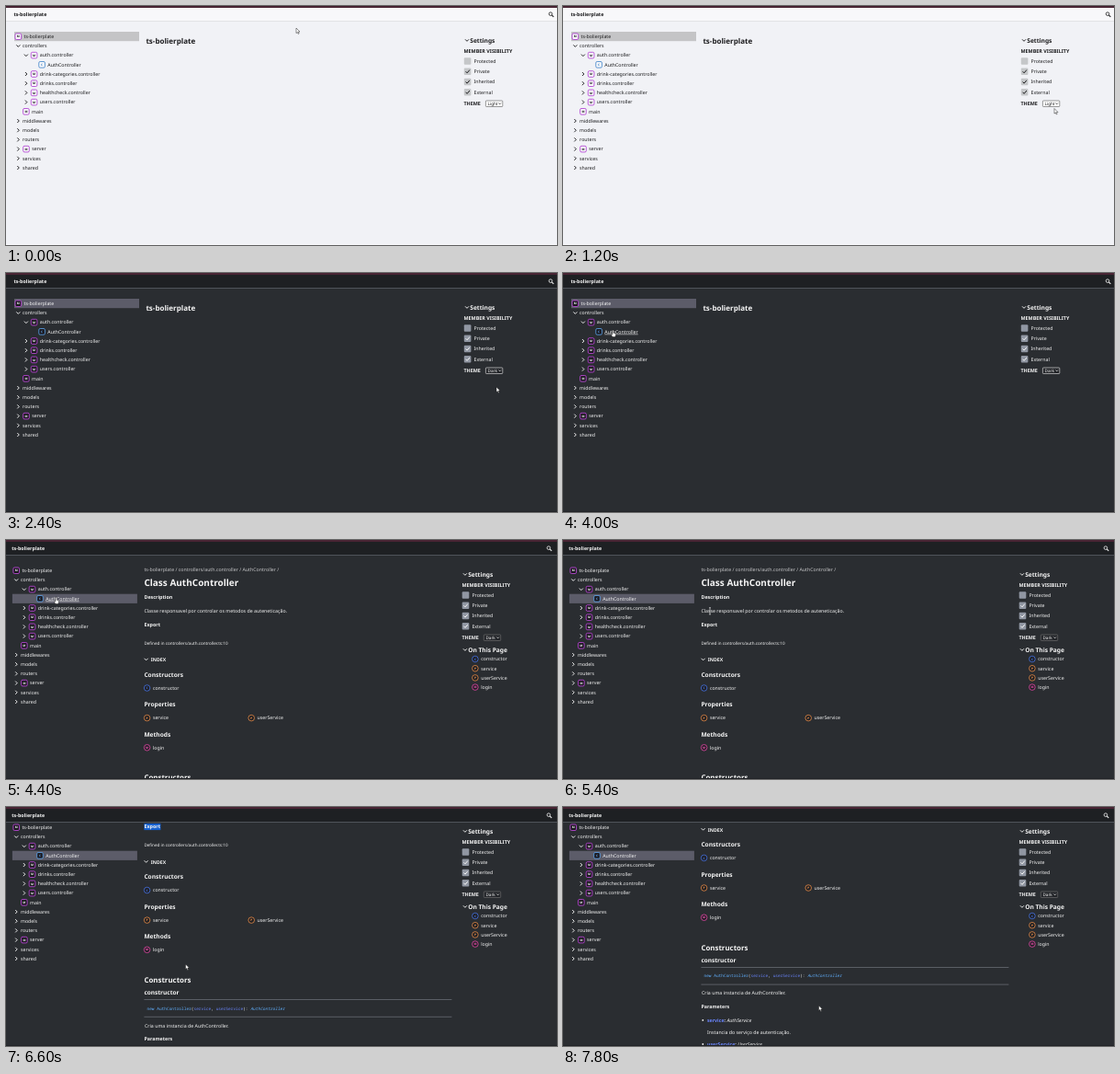
An HTML page that plays this animation: 600 px wide and 260 px high, repeating every 8000 ms.

```html
<!DOCTYPE html>
<html lang="en">
<head>
<meta charset="utf-8">
<title>Documentation theme demo</title>
<style>
html, body { margin: 0; width: 100%; height: 100%; overflow: hidden; }
svg {
  display: block; width: 100vw; height: 100vh;
  --bg: #f1f2f6; --bar: #f8f8fa; --text: #1c1c1e; --accent: #c5c7c9; --active: #c4c4c6;
  --icon: #f8f8fa; --module: #a627cc; --class: #2c78c4; --field: #fff; --ring: #555; --edge: #fafafc;
  background: var(--bg);
}
svg.dark {
  --bg: #2a2d31; --bar: #1e2023; --text: #f5f5f5; --accent: #9096a2; --active: #5c5c69;
  --icon: #1c1a20; --module: #d24df0; --class: #61b0ff; --field: #24262a; --ring: #eee; --edge: #202226;
}
svg.dark.doc { --ring: #777; }
text { font-family: "Noto Sans", "Open Sans", sans-serif; fill: var(--text); text-rendering: geometricPrecision; white-space: pre; }
.b { font-weight: 700; }
.i { font-style: italic; }
.aside { fill: #c8c8ca; }
.code { font-family: "Noto Sans Mono", "DejaVu Sans Mono", monospace; }
.blue { fill: #6a86ff; }
.type { fill: #61b0ff; }
.chev { fill: none; stroke: var(--text); stroke-width: .95; }
.hover { text-decoration: underline; }
</style>
</head>
<body>
<svg viewBox="0 0 600 260" preserveAspectRatio="none">
  <rect width="600" height="260" fill="var(--bg)"/>
  <g id="home"></g>
  <g id="doc"></g>
  <g id="sides"></g>
  <rect y="259" width="600" height="1" fill="var(--edge)"/>
  <rect width="600" height="16.5" fill="var(--bar)"/>
  <rect y="16.4" width="600" height=".4" fill="var(--accent)"/>
  <rect width="600" height="2" fill="#482433"/>
  <g id="bar"></g>
  <g id="cursor" stroke-linejoin="round"></g>
</svg>
<script>
const $ = id => document.getElementById(id);
const svg = document.querySelector('svg');

// y is the visual middle of the line
const text = (x, y, s, size = 5.25, cls = '', id = '') =>
  `<text x="${x}" y="${y + .35 * size}" font-size="${size}" class="${cls}" id="${id}">${s}</text>`;
const bold = (x, y, s, size = 5.4) => text(x, y, s, size, 'b');
const span = (s, cls) => `<tspan class="${cls}">${s}</tspan>`;
const rect = (x, y, w, h, fill, more = '') =>
  `<rect x="${x}" y="${y}" width="${w}" height="${h}" fill="${fill}" ${more}/>`;
const chevron = (x, y, open) =>
  `<path class="chev" d="${open ? `M${x - 2} ${y - 1}l2 2 2-2` : `M${x - 1} ${y - 2}l2 2-2 2`}"/>`;
const letter = (x, y, s, color) =>
  `<text x="${x}" y="${y + 1.15}" font-size="3.2" class="b" text-anchor="middle" style="fill:${color}">${s}</text>`;
const square = (x, y, s, color) =>
  rect(x - 3.3, y - 3.3, 6.6, 6.6, 'var(--icon)', `rx="1.4" stroke="${color}" stroke-width=".75"`) +
  letter(x, y, s, s === 'C' ? color : 'var(--text)');

const members = {
  constructor: ['C', '#4d7fff'], service: ['P', '#ff984d'],
  userService: ['P', '#ff984d'], login: ['M', '#ff4db8']
};
const member = (x, y, name) => {
  const [s, color] = members[name];
  return `<circle cx="${x}" cy="${y}" r="3.3" fill="#1f2024" stroke="${color}" stroke-width=".7"/>` +
    letter(x, y, s, color) + text(x + 6.3, y, name);
};

// name, indent level, chevron (o open, c closed), icon
const tree = [
  ['ts-bolierplate', 0, '', 'M'], ['controllers', 0, 'o'], ['auth.controller', 1, 'o', 'M'],
  ['AuthController', 3, '', 'C'], ['drink-categories.controller', 1, 'c', 'M'],
  ['drinks.controller', 1, 'c', 'M'], ['healthcheck.controller', 1, 'c', 'M'],
  ['users.controller', 1, 'c', 'M'], ['main', 1, '', 'M'], ['middlewares', 0, 'c'],
  ['models', 0, 'c'], ['routers', 0, 'c'], ['server', 0, 'c', 'M'], ['services', 0, 'c'], ['shared', 0, 'c']
];
const treeRow = ([name, level, arrow, icon], i) => {
  const y = 33.2 + i * 10.2;
  let x = 13.3 + level * 8.6, out = '';
  if (arrow) { out += chevron(x, y, arrow === 'o'); x += icon ? 8.7 : -1.4; }
  if (icon) out += square(x, y, icon, icon === 'C' ? 'var(--class)' : 'var(--module)');
  return out + text(x + 6.2, y, name, 5.25, '', icon === 'C' ? 'link' : '');
};

const option = (label, i) => {
  const y = 60 + i * 11.25;
  return rect(498.8, y - 3.8, 7.6, 7.6, 'var(--accent)', 'rx="1"') +
    (i ? `<path d="M500.6 ${y}l1.5 1.6 2.8-3.3" fill="none" stroke="var(--text)" stroke-width="1"/>` : '') +
    text(509.5, y, label);
};
const menu = rect(523, 109.6, 18, 18.4, '#fff', 'stroke="#888" stroke-width=".4"') +
  rect(523.2, 121.7, 17.6, 6, '#3a68c8') +
  text(524.6, 112.6, 'OS', 4.5) + text(524.6, 118.6, 'Light', 4.5) +
  `<g style="--text:#fff">${text(524.6, 124.5, 'Dark', 4.5)}</g>`;

$('bar').innerHTML = bold(8.4, 9.2, 'ts-bolierplate', 5.35) +
  '<g fill="none" stroke="var(--text)"><circle cx="593" cy="8.6" r="1.8" stroke-width=".8"/>' +
  '<path d="M594.3 9.9l2 2" stroke-width="1.1"/></g>';

$('home').innerHTML = bold(152.4, 38, 'ts-bolierplate', 8);

$('sides').innerHTML = rect(9, 28, 136, 10.2, 'var(--active)', 'id="active"') + tree.map(treeRow).join('') +
  chevron(502, 37.3, true) + bold(505.3, 38, 'Settings', 6.6) +
  bold(498.5, 49.6, 'MEMBER VISIBILITY') +
  ['Protected', 'Private', 'Inherited', 'External'].map(option).join('') +
  bold(498.5, 106.6, 'THEME') +
  rect(522.4, 103, 18.4, 6.5, 'var(--field)', 'rx=".8" stroke="var(--ring)" stroke-width=".6"') +
  text(524.6, 106.2, 'Light', 4.6, '', 'theme') +
  '<path d="M536.6 105.5l1.2 1.3 1.2-1.3" fill="none" stroke="var(--text)" stroke-width=".7"/>' +
  `<g id="menu">${menu}</g>` +
  `<g id="toc">${chevron(502, 119.3, true)}${bold(505.3, 120, 'On This Page', 6.6)}` +
  Object.keys(members).map((name, i) => member(513, 129.5 + i * 10.2, name)).join('') + '</g>';

const L = 150.4;
const rule = y => rect(L, y, 335, .5, '#8a8e98');
const signature = span('new ', 'type') + span('AuthController', 'type') + '(' + span('service', 'blue') + ', ' +
  span('userService', 'blue') + '): ' + span('AuthController', 'type i');
const param = (y, name, type) => `<circle cx="152.3" cy="${y}" r=".9" fill="var(--text)"/>` +
  text(157, y, span(name, 'b blue') + span(':', 'b') + ' ' + span(type, 'i'));

$('doc').innerHTML =
  text(L, 32, 'ts-bolierplate / controllers/auth.controller / AuthController /', 5.25, 'aside') +
  bold(L, 46.3, 'Class AuthController', 10) +
  bold(L, 62.5, 'Description') +
  text(L, 77, 'Classe responsavel por controlar os metodos de auteneticação.') +
  rect(L, 88.4, 18, 7.2, '#1560cf', 'id="mark"') +
  bold(L, 92, 'Export') +
  text(L, 112.3, 'Defined in controllers/auth.controller.ts:10', 4.6) +
  chevron(152.6, 129.8, true) + bold(157.7, 130.4, 'INDEX', 5.2) +
  bold(L, 146.6, 'Constructors', 6.6) + member(153.6, 161, 'constructor') +
  bold(L, 179, 'Properties', 6.6) + member(153.6, 193.6, 'service') + member(267.2, 193.6, 'userService') +
  bold(L, 211.3, 'Methods', 6.6) + member(153.6, 225.8, 'login') +
  bold(L, 258.7, 'Constructors', 7.9) +
  bold(L, 272.7, 'constructor', 6.5) +
  rule(279.6) + text(153.5, 289.5, signature, 4.49, 'code') + rule(298.4) +
  text(151, 308.2, 'Cria uma instancia de AuthController.') +
  bold(L, 323, 'Parameters', 5.3) +
  param(337.5, 'service', 'AuthService') +
  text(157, 350.7, 'Instancia do serviço de autenticação.') +
  param(363.6, 'userService', 'UserService');

const cursors = {
  arrow: '<path d="M0 0V5.6L1.3 4.4 2.2 6.4 3.1 6 2.3 4H4Z" fill="#fff" stroke="#111" stroke-width=".45"/>',
  hand: '<path d="M-.7 0a.7.7 0 0 1 1.4 0V2.4L3 3V5L2.3 6.8H-.7L-2 4.2-1.4 3.6-.7 4.2Z" fill="#fff" stroke="#111" stroke-width=".45"/>',
  beam: '<path d="M-1-3.6H1M0-3.6V3.6M-1 3.6H1" fill="none" stroke="#fff" stroke-width=".55"/>'
};

// time, x, y
const path = [
  [0, 316, 24], [200, 330, 27], [800, 520, 100], [1000, 536, 117], [1400, 534, 106], [1600, 533, 107],
  [2200, 533, 123], [2400, 534, 124], [2600, 515, 121], [3600, 75, 70], [3800, 57, 64], [4000, 54.5, 62.8],
  [4400, 54.5, 62.8], [4800, 110, 72], [5400, 160, 77.3], [5600, 151, 91], [6000, 168, 92],
  [6200, 180, 125], [6600, 195.5, 171], [7000, 205, 165], [7200, 215, 160], [7800, 278.5, 216]
];
function pointAt(t) {
  const n = path.findIndex(p => p[0] >= t);
  if (n < 1) return path[0].slice(1);
  const [a, b] = [path[n - 1], path[n]];
  const k = (t - a[0]) / (b[0] - a[0]);
  return [a[1] + (b[1] - a[1]) * k, a[2] + (b[2] - a[2]) * k];
}

const show = (id, on) => { $(id).style.display = on ? '' : 'none'; };
const move = (id, x, y) => $(id).setAttribute('transform', `translate(${x} ${y})`);
let lastStep = -1;

function draw(t) {
  const dark = t >= 2400, doc = t >= 4400;
  const hover = t >= 3800 && t < 4600;
  const scroll = t < 6200 ? 0 : t < 6400 ? 35.2 : t < 6800 ? 70.5 : 105.6;
  const shift = doc ? -2.1 : 0;

  svg.classList.toggle('dark', dark);
  svg.classList.toggle('doc', doc);
  show('home', !doc);
  show('doc', doc);
  show('toc', doc);
  show('menu', t >= 1600 && !dark);
  $('theme').textContent = dark ? 'Dark' : 'Light';
  $('link').classList.toggle('hover', hover);
  $('active').setAttribute('y', doc ? 58.7 : 28);
  $('mark').setAttribute('width', 18 * Math.min(1, Math.max(0, (t - 5600) / 400)));
  move('sides', shift, -Math.min(scroll, 11));
  move('bar', shift, 0);
  move('doc', 0, -scroll);

  const kind = hover ? 'hand' : t >= 5200 && t < 6200 ? 'beam' : 'arrow';
  $('cursor').innerHTML = cursors[kind];
  move('cursor', ...pointAt(t));
}

function tick(now) {
  const step = Math.floor(now % 8000 / 200);
  if (step !== lastStep) draw((lastStep = step) * 200);
  requestAnimationFrame(tick);
}
draw(0);
requestAnimationFrame(tick);
</script>
</body>
</html>
```
